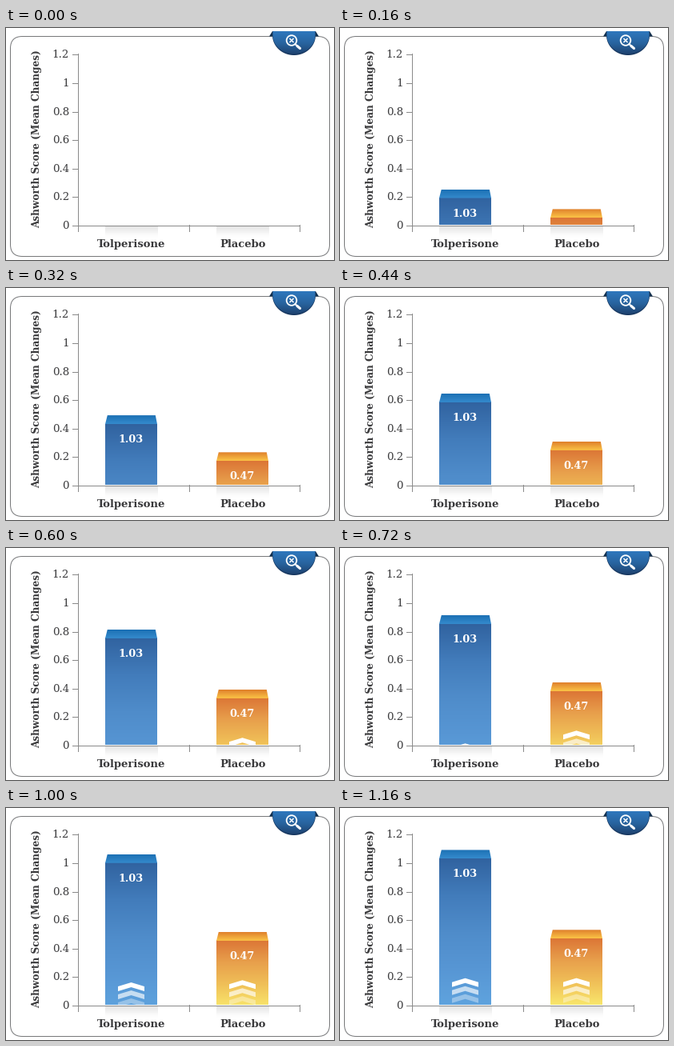
These frames come from a looping animation (410x290 px, 8000 ms). A matplotlib script:

```python
import numpy as np
import matplotlib.pyplot as plt
from matplotlib.animation import FuncAnimation
from matplotlib.colors import LinearSegmentedColormap, to_rgba
from matplotlib.patches import Circle, FancyBboxPatch, Polygon, Rectangle

W, H, DPI = 410, 290, 80
PX = 72 / DPI               # points per pixel
STEP, LOOP = 40, 8000
RISE = 1200                 # length of the ease-out, ms
LAST = 29                   # the bars rest from this step on
LEFT, BASE = 89, 246        # pixel column and row of the axes
START = 251                 # y of the bar tops before they rise
CAP = 11                    # height of the bevel on a bar
BAR_W = 65
INK, LINE = "#3a3a3c", "#8a8a8a"

plt.rcParams["font.family"] = "DejaVu Serif"
fig = plt.figure(figsize=(W / DPI, H / DPI), dpi=DPI, facecolor="white")
ax = fig.add_axes([0, 0, 1, 1])
ax.set_xlim(0, W)
ax.set_ylim(H, 0)
ax.axis("off")


def gradient(x0, x1, y0, y1, colors, z):
    """Vertical gradient from y0 (top) to y1 (bottom)."""
    cmap = LinearSegmentedColormap.from_list("g", colors)
    rows = cmap(np.linspace(0, 1, 200))[:, None, :].repeat(2, axis=1)
    return ax.imshow(rows, extent=(x0, x1, y1, y0), aspect="auto",
                     interpolation="bilinear", zorder=z)


def line(xs, ys, color=LINE, width=1, z=5, **kw):
    ax.plot(xs, ys, color=color, lw=width * PX, zorder=z, **kw)


def label(x, y, s, size, color=INK, weight="bold", ha="center", z=6, **kw):
    return ax.text(x, y, s, fontsize=size * PX, color=color, weight=weight,
                   ha=ha, va="baseline", zorder=z, **kw)


def draw_panel():
    ax.add_patch(FancyBboxPatch(
        (5.5, 10.5), 399, 275, boxstyle="round,pad=0,rounding_size=15",
        fc="white", ec="#77787a", lw=PX, zorder=0))


def draw_axes():
    line([LEFT + 0.5] * 2, [32, BASE + 8])
    line([LEFT - 6, 366.5], [BASE + 0.5] * 2)
    for x in (228.5, 366.5):
        line([x, x], [BASE, BASE + 8])
    for i, s in enumerate(("0", "0.2", "0.4", "0.6", "0.8", "1", "1.2")):
        y = round(BASE - 35.6 * i)
        line([LEFT - 6, LEFT], [y + 0.5] * 2)
        label(79, y + 5, s, 13.4, weight="normal", ha="right")
    label(156.5, 274, "Tolperisone", 13.1)
    label(296, 274, "Placebo", 13.1)
    label(42, 138.5, "Ashworth Score (Mean Changes)", 12.1,
          rotation=90, rotation_mode="anchor")


def draw_badge():
    mid = 360
    a = np.linspace(0, np.pi, 60)

    def bowl(rx, ry):
        pts = np.column_stack([mid + rx * np.cos(a), 9 + ry * np.sin(a)])
        return np.vstack([pts, [mid - rx, 4], [mid + rx, 4]])

    for side in (-1, 1):
        ax.add_patch(Polygon([(mid + side * 31, 10.5), (mid + side * 27, 4),
                              (mid + side * 27, 10.5)],
                             fc="#12304f", ec="none", zorder=7))
    ax.add_patch(Polygon(bowl(27, 25), fc="#17375f", ec="none", zorder=8))
    fill = gradient(mid - 28, mid + 28, 4, 34,
                    ["#2f78bd", "#28649f", "#1d3f6b"], 9)
    fill.set_clip_path(Polygon(bowl(26.5, 23.5), transform=ax.transData))

    ax.add_patch(Circle((357, 15.5), 6.3, fc="none", ec="white",
                        lw=1.8 * PX, zorder=10))
    line([361.5, 364], [20, 22.5], "white", 2, 10)
    line([364, 367.5], [22.5, 25.5], "white", 3.2, 10, solid_capstyle="round")
    for d in (-2, 2):
        line([355, 359], [15.5 - d, 15.5 + d], "white", 1.5, 10)


class Bar:
    """A bar with its value and arrows, rising from behind the x axis."""

    def __init__(self, x, top, value, front, cap):
        self.x, self.top = x, top
        self.mid = x + BAR_W / 2
        mask = Rectangle((x - 2, 0), BAR_W + 4, BASE, transform=ax.transData)
        self.front = gradient(x, x + BAR_W, 0, 1, front, 2)
        self.front.set_clip_path(mask)
        self.cap = gradient(x, x + BAR_W, 0, 1, cap, 3)
        self.value = label(self.mid, 0, value, 12.9, "white", z=4,
                           clip_on=True)
        self.value.set_clip_path(mask)
        self.arrows = []
        for alpha in (1, 0.66, 0.36):
            arrow = Polygon([(0, 0)] * 6, fc="white", ec="none", alpha=alpha,
                            zorder=4)
            ax.add_patch(arrow)
            arrow.set_clip_path(mask)
            self.arrows.append(arrow)
        fade = [to_rgba("#e2e2e2", 1), to_rgba("#f1f1f1", 0.8),
                to_rgba("#ffffff", 0)]
        gradient(x, x + BAR_W + 1, BASE + 1, BASE + 17, fade, 1)

    def rise(self, part):
        x0, x1 = self.x, self.x + BAR_W
        drop = (1 - part) * (START - self.top)
        top = self.top + drop
        self.front.set_extent((x0, x1, BASE + drop, top + CAP))
        self.cap.set_extent((x0, x1, top + CAP, top))
        low, high = min(top + CAP, BASE), min(top, BASE)
        self.cap.set_clip_path(Polygon(
            [(x0, low), (x0 + 2.8, high), (x1 - 2.2, high), (x1, low)],
            transform=ax.transData))
        self.value.set_y(top + 34)
        m, w = self.mid, 16.5
        for i, arrow in enumerate(self.arrows):
            y = 212.5 + 10 * i + drop
            arrow.set_xy([(m, y), (m + w, y + 5), (m + w, y + 11),
                          (m, y + 6), (m - w, y + 11), (m - w, y + 5)])


draw_panel()
draw_axes()
draw_badge()
bars = [
    Bar(124, 52.2, "1.03",
        ["#3163a0", "#427cbb", "#4f8cca", "#5796d4", "#5fa3de"],
        ["#1c70b4", "#358bcd"]),
    Bar(263, 152.2, "0.47",
        ["#dc7636", "#e8a04c", "#f0c058", "#f9e66c"],
        ["#df7f2c", "#fbc446"]),
]


def update(i):
    u = min(i, LAST) * STEP / RISE
    part = 1 - (1 - u) ** 2
    for bar in bars:
        bar.rise(part)
    return []


anim = FuncAnimation(fig, update, frames=LOOP // STEP, interval=STEP,
                     repeat=True, repeat_delay=0, blit=False)
plt.show()
```
